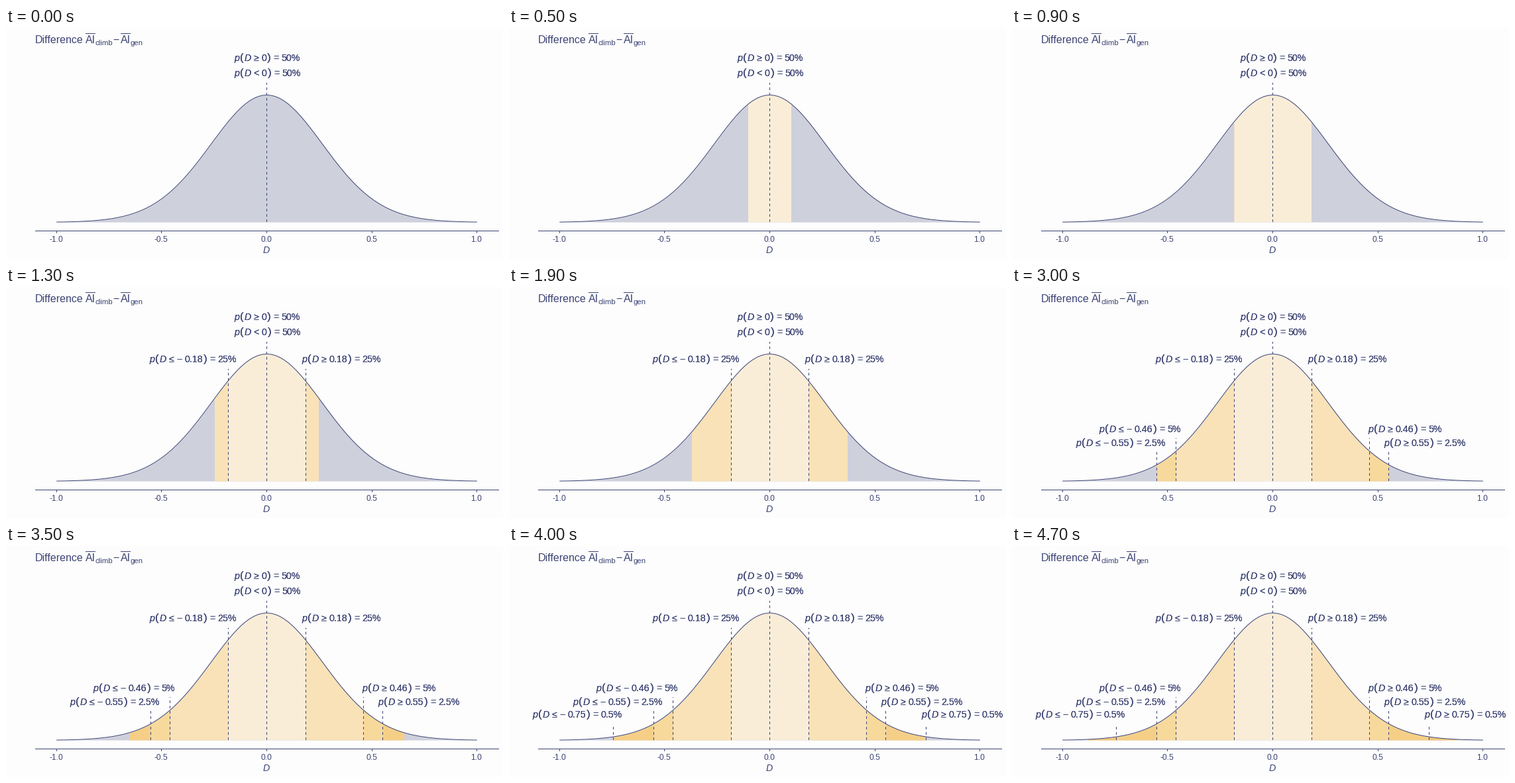
Write a matplotlib script that moves like this. It is 750 by 350 pixels and loops after 5400 ms.

```python
import matplotlib.pyplot as plt
import numpy as np
from matplotlib.animation import FuncAnimation
from matplotlib.patches import Rectangle

W, H, DPI = 750, 350, 100
PX = 72 / DPI
FLOOR, BASE, PEAK = 294, 294.5, 193
INK, BACK, AREA = "#3d4474", "#fdfdfd", "#ced0dc"
SHADES = ["#faedd8", "#f9e2b7", "#f7d99c", "#f5cf87", "#f4c679"]
STEPS, HOLD = 47, 7

plt.rcParams["font.family"] = "Liberation Sans"

# quantile, label value, percent, baseline, line top, left and right label x
MARKS = [
    (0.1843, "0.18", "25%", 114, 124, 216, 446),
    (0.460, "0.46", "5%", 220, 229, 131, 537),
    (0.553, "0.55", "2.5%", 241, 250, 96, 561),
    (0.745, "0.75", "0.5%", 260, 274, 35, 622),
]
CUTS = [m[0] for m in MARKS]
REACH = [0] + sorted([i / 49 for i in range(1, STEPS - len(CUTS) + 1)] + CUTS)

fig = plt.figure(figsize=(W / DPI, H / DPI), dpi=DPI, facecolor=BACK)
ax = fig.add_axes([0, 0, 1, 1])
ax.set(xlim=(0, W), ylim=(H, 0))
ax.axis("off")


def px(d):
    return 393.53 + 317.3 * d


def column(d):
    return np.floor(px(d))


def curve(d):
    return BASE - PEAK * (1 + d**2 / 3.06) ** -21.5


def write(x, y, s, size, **kw):
    return ax.text(x, y, s, fontsize=size * PX, color=INK, va="baseline", **kw)


def line(x, y, **kw):
    return ax.plot(x, y, color=INK, lw=PX, snap=False,
                   solid_capstyle="butt", dash_capstyle="butt", **kw)[0]


def area(a, b, color):
    d = np.linspace(a, b, 120)
    return ax.fill_between(px(d), np.minimum(curve(d), FLOOR), FLOOR,
                           color=color, lw=0, antialiased=False)


def dashes(d, top):
    x = column(d) + 0.5
    return line([x, x], [FLOOR, top], ls=(0, (4, 4)), zorder=4)


def prob(x, y, *condition):
    """Probability label with tall brackets, overprinted to look heavier."""
    *terms, pct = condition
    parts, loose = [], False
    for run in ("p", "(", "D", *terms, ")", "=", pct):
        sign = run in "\u2265\u2264<=\u2212"
        if parts:
            x += 3.6 if sign or loose else 1.2
        size = 17 if run in "()" else 14.2
        style = "italic" if run in "pD" else "normal"
        parts += [write(x, y, run, size, style=style, zorder=5)
                  for _ in range(2)]
        x += parts[-1].get_window_extent().width
        loose = sign
    return parts


# title
write(44, 23, "Difference", 16)
for x, sub in ((120, "climb"), (173, "gen")):
    write(x, 23, "AI", 16)
    write(x + 14.5, 26, sub, 11.4)
    line([x, x + 15], [8.5, 8.5])
write(161, 23, "\u2212", 16)

# axis
line([44, 744], [307.5, 307.5])
for d in np.linspace(-1, 1, 5):
    x = column(d)
    line([x + 0.5, x + 0.5], [308, 311])
    write(x - 0.5, 324, f"{d:.1f}", 12, ha="center")
write(392.5, 341, "D", 14.2, ha="center", style="italic")

# distribution
area(-1, 1, AREA)
edges = [0] + CUTS + [1]
bands = [area(s * a, s * b, c) for a, b, c in zip(edges, edges[1:], SHADES)
         for s in (-1, 1)]
grid = np.linspace(-1, 1, 99)
line(px(grid), curve(grid), zorder=3)
dashes(0, 83)
prob(344, 50, "\u2265", "0", "50%")
prob(344, 73, "<", "0", "50%")

marks = []
for q, value, pct, y, top, left, right in MARKS:
    parts = [dashes(-q, top), dashes(q, top)]
    parts += prob(left, y, "\u2264", "\u2212", value, pct)
    parts += prob(right, y, "\u2265", value, pct)
    marks.append((REACH.index(q), parts))


def draw(i):
    k = min(i, STEPS)
    x0, x1 = column(-REACH[k]), column(REACH[k])
    window = Rectangle((x0, 0), x1 - x0, H, transform=ax.transData)
    for band in bands:
        band.set_visible(k > 0)
        band.set_clip_path(window)
    for start, parts in marks:
        for part in parts:
            part.set_visible(k >= start)
    return []


anim = FuncAnimation(fig, draw, frames=STEPS + HOLD, interval=100,
                     init_func=lambda: draw(0), repeat=True, repeat_delay=0)
plt.show()
```
